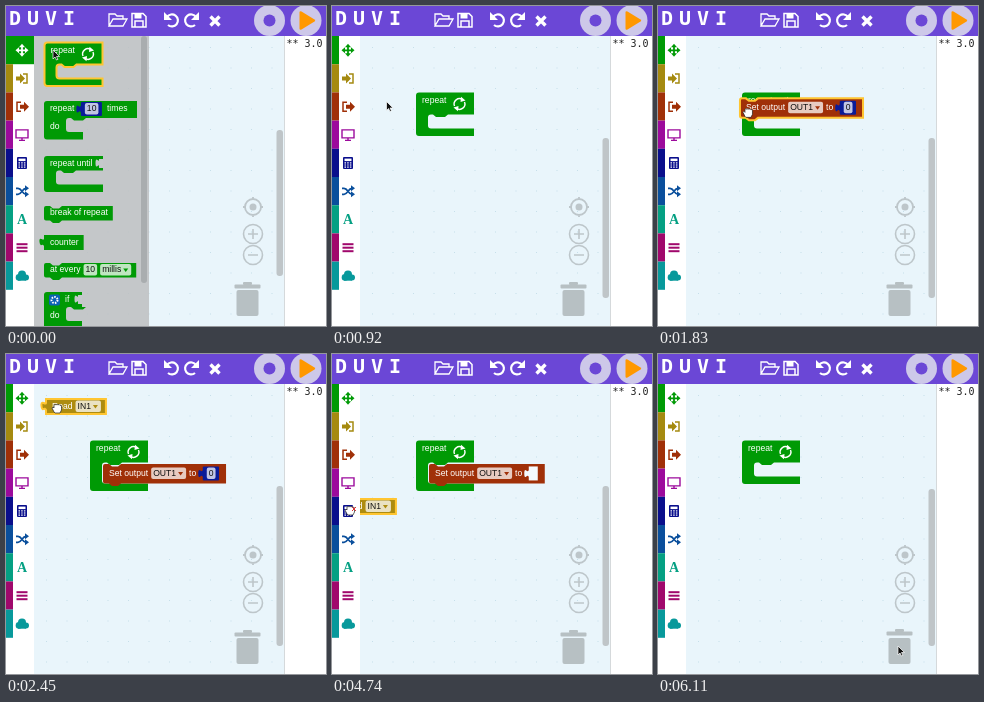
An HTML page with a canvas that plays this animation: 320 px wide and 320 px high, repeating every 6.26 s.

```html
<!DOCTYPE html>
<html lang="en">
<head>
<meta charset="utf-8">
<title>Block editor demo</title>
<style>
html, body { margin: 0; width: 100%; height: 100%; overflow: hidden; }
canvas { display: block; width: 100vw; height: 100vh; }
</style>
</head>
<body>
<canvas id="stage" width="320" height="320"></canvas>
<script>
const ctx = document.getElementById('stage').getContext('2d');
const LOOP = 6260, STEPS = 41;
const GREEN = '#009a05', BROWN = '#a03008', OLIVE = '#ad8c10', NAVY = '#0a1b98', PURPLE = '#6b47d6';
const CATEGORIES = [GREEN, '#a58a10', BROWN, '#9c0a9c', '#0a0f8c', '#0a4f9c', '#05a083', '#a0086c', '#08999b'];
const BLOCK_FONT = "8.6px 'Liberation Sans', Arial, sans-serif";

// Basic drawing helpers
function rect(x, y, w, h, color, r = 0) {
  ctx.fillStyle = color;
  ctx.beginPath();
  ctx.roundRect(x, y, w, h, r);
  ctx.fill();
}
function disc(x, y, r, color) {
  ctx.fillStyle = color;
  ctx.beginPath();
  ctx.arc(x, y, r, 0, 7);
  ctx.fill();
}
function text(str, x, y, color, font = BLOCK_FONT) {
  ctx.font = font;
  ctx.fillStyle = color;
  ctx.textBaseline = 'middle';
  ctx.fillText(str, x, y);
}
function stroke(d, color, width) {
  ctx.strokeStyle = color;
  ctx.lineWidth = width;
  ctx.stroke(new Path2D(d));
}
function fill(d, color) {
  ctx.fillStyle = color;
  ctx.fill(new Path2D(d));
}
function at(x, y, draw) {
  ctx.save();
  ctx.translate(x, y);
  draw();
  ctx.restore();
}
function textWidth(str) {
  ctx.font = BLOCK_FONT;
  return ctx.measureText(str).width;
}

// Block contents: plain strings, {d} dropdown, {f} field, {n} number block, {read}, {empty}, {gear}
const READ = ['Read', { d: 'IN1' }];
const isPlug = t => Boolean(t.n || t.read || t.empty);
function tokenWidth(t) {
  if (typeof t === 'string') return textWidth(t);
  if (t.d) return textWidth(t.d) + 12;
  if (t.f) return textWidth(t.f) + 4;
  if (t.n) return textWidth(t.n) + 11.5;
  if (t.read) return flow(READ).width;
  return t.gear ? 12 : 9;
}
function flow(tokens) {
  let x = 6;
  const items = tokens.map(token => {
    if (isPlug(token)) x += 3.5;
    const item = { token, x };
    x += tokenWidth(token) + (isPlug(token) ? 5 : 3);
    return item;
  });
  return { items, width: x + 2 };
}
function field(str, x, y, color, arrow) {
  const w = textWidth(str) + (arrow ? 12 : 4);
  rect(x, y - 6, w, 11.5, 'rgba(255,255,255,.75)', 2);
  text(str, x + 2, y, '#111');
  if (arrow) fill(`M${x + w - 8} ${y - 1.5}h5l-2.5 3.5z`, color);
}
function tab(x, y, color) {
  fill(`M${x + .5} ${y - 4}v8q-1-3-3-1t-2-3t2-3t3-1z`, color);
}
function drawTokens(tokens, x, y, color) {
  for (const item of flow(tokens).items) {
    const t = item.token, tx = x + item.x;
    if (typeof t === 'string') text(t, tx, y, '#fff');
    else if (t.d || t.f) field(t.d || t.f, tx, y, color, t.d);
    else if (t.n) {
      rect(tx, y - 7, tokenWidth(t), 14, NAVY, 1);
      tab(tx, y, NAVY);
      field(t.n, tx + 4, y, NAVY);
    } else if (t.read) readBlock(tx, y - 7, true);
    else if (t.empty) {
      rect(tx, y - 7, 9, 14, '#f4fafd');
      tab(tx, y, '#f4fafd');
    } else {
      rect(tx - 1, y - 5.5, 11, 11, '#0b62b4', 2);
      ctx.setLineDash([1.5, 1.2]);
      ctx.strokeStyle = '#fff';
      ctx.lineWidth = 2;
      ctx.beginPath();
      ctx.arc(tx + 4.5, y, 3, 0, 7);
      ctx.stroke();
      ctx.setLineDash([]);
    }
  }
}
function outline(d, selected) {
  if (selected) stroke(d, '#ffc531', 2);
}
function statement(x, y, tokens, selected, color = BROWN) {
  const h = tokens.some(isPlug) ? 19.5 : 14.5, w = flow(tokens).width;
  const d = `M${x + 2} ${y}h4l3 2.5h6l3-2.5H${x + w}v${h}H${x + 18}l-3 2.5h-6l-3-2.5H${x + 2}q-2 0-2-2V${y + 2}q0-2 2-2z`;
  fill(d, color);
  drawTokens(tokens, x, y + h / 2 - .3, color);
  outline(d, selected);
}
function valueBlock(x, y, tokens, color, selected) {
  const w = flow(tokens).width;
  const d = `M${x} ${y}h${w}v15h${-w}v-4q-1-2-2.5-1t-2-3t2-3t2.5 0z`;
  fill(d, color);
  drawTokens(tokens, x, y + 7.5, color);
  outline(d, selected);
}
function readBlock(x, y, selected) {
  valueBlock(x, y, READ, OLIVE, selected);
}
// C-shaped block with a statement opening
function loopBlock(x, y, o) {
  const { w, top, inner = 14, arm = 12, foot = w, selected } = o;
  const a = x + arm, t = y + top, b = t + inner;
  const d = `M${x + 3} ${y}H${x + w}V${t}H${a + 20}l-3 2.5h-9l-3-2.5h-2q-3 0-3 3V${b - 3}q0 3 3 3H${x + foot}v7.5` +
    `H${x + 3}q-3 0-3-3V${y + 3}q0-3 3-3z`;
  fill(d, GREEN);
  drawTokens(o.tokens, x, y + (o.textY || 8), GREEN);
  if (o.label) text(o.label, x + 6, t + 9, '#fff');
  if (o.socket) {
    rect(x + w - 4, y + 3, 4, 9, '#c5c9cb');
    tab(x + w - 3, y + 7, '#c5c9cb');
  }
  outline(d, selected);
}
function repeatBlock(x, y, inner = 14, selected) {
  loopBlock(x, y, { w: 58, top: 22, inner, tokens: ['repeat'], selected });
  at(x + 43.5, y + 11.5, () => {
    for (let i = 0; i < 2; i++) {
      stroke('M-5 2A5.3 5.3 0 0 1 3-4.3', '#fff', 1.4);
      fill('M1.5-7.2L6-3.6L1-2z', '#fff');
      ctx.rotate(Math.PI);
    }
  });
}
const setOutput = plug => ['Set output', { d: 'OUT1' }, 'to', plug];
const ZERO = { n: '0' };

// Flyouts
function flyout(width) {
  rect(28, 30, width, 290, 'rgba(190,192,193,.85)');
}
function loopFlyout() {
  flyout(115);
  rect(135, 30, 6, 247, '#a9adaf', 3);
  repeatBlock(38.5, 36.5, 14, true);
  loopBlock(38, 95, { w: 93, top: 17, arm: 22, foot: 39, tokens: ['repeat', { n: '10' }, 'times'], label: 'do' });
  loopBlock(38, 150, { w: 59, top: 14.5, tokens: ['repeat until'], socket: true });
  statement(38, 200, ['break of repeat'], false, GREEN);
  valueBlock(38, 229, ['counter'], GREEN);
  statement(38, 257, ['at every', { f: '10' }, { d: 'millis' }], false, GREEN);
  loopBlock(38, 286, { w: 38, top: 15, arm: 22, tokens: [{ gear: 1 }, 'if'], label: 'do', socket: true });
}
function outputFlyout() {
  flyout(250);
  const play = ['Play', { d: 'OUT1' }], led = { d: 'onHead' };
  statement(38.5, 37, setOutput(ZERO), true);
  statement(38, 73, ['Set servo', { d: 'OUT1' }, 'to', ZERO]);
  statement(38, 110, [...play, 'octave', { d: '1' }, 'note', { d: 'C' }]);
  statement(38, 141, [...play, 'frequency', { n: '260' }, 'Hz']);
  statement(38, 177.5, ['Mute', { d: 'OUT1' }]);
  statement(38, 209, ['Set LED', led, 'red', ZERO, 'green', ZERO, 'blue', ZERO, 'at', ZERO]);
  statement(38, 245.5, ['Clear LED', led]);
}
function inputFlyout() {
  flyout(82);
  readBlock(40, 45, true);
}

// Interface
function header() {
  rect(0, 0, 320, 30, PURPLE);
  ctx.letterSpacing = '6px';
  text('DUVI', 3, 14, '#fff', "bold 20px 'DejaVu Sans Mono', monospace");
  ctx.letterSpacing = '0px';
  stroke('M103 20V8h6l2 2h6v3M103 20l4-7h14l-4 7z', '#fff', 1.3);
  stroke('M126 7.5h11l3 3v10.5h-14zM129 21v-6h8v6', '#fff', 1.5);
  rect(128.5, 7.5, 7, 5, '#fff');
  stroke('M161 11A6 6 0 1 1 162 19', '#fff', 2.2);
  fill('M158 6v8h8z', '#fff');
  stroke('M190 11A6 6 0 1 0 189 19', '#fff', 2.2);
  fill('M193 6v8h-8z', '#fff');
  stroke('M204.500 10.500l9 9M213.500 10.500l-9 9', '#fff', 3.4);
  disc(263.5, 14.5, 15.5, '#cdc8e9');
  disc(263.5, 14.5, 6, PURPLE);
  disc(300, 14.5, 15.5, '#cdc8e9');
  fill('M293.500 6.500q0-2 2-1l13 8q1.500 1 0 2l-13 8q-2 1-2-1z', '#ff9800');
}
const ICONS = [
  c => {
    stroke('M-4 0H4M0-4V4', c, 1.8);
    for (let i = 0; i < 4; i++) { fill('M3-3L6.500 0L3 3z', c); ctx.rotate(Math.PI / 2); }
  },
  c => { fill('M-6-2h4v-3l5 5l-5 5v-3h-4z', c); stroke('M1-4.500h4v9h-4', c, 1.5); },
  c => { fill('M-2-2h4v-3l5 5l-5 5v-3h-4z', c); stroke('M-1-4.500h-4v9h4', c, 1.5); },
  c => { stroke('M-6-5h12v8h-12zM-3 5.500h6M0 3v2', c, 1.4); },
  c => {
    rect(-5, -6, 10, 12, c, 1);
    rect(-3.5, -4.5, 7, 2.5, '#fff');
    for (let i = 0; i < 9; i++) rect(-3.5 + i % 3 * 2.7, -.8 + Math.floor(i / 3) * 2.1, 1.5, 1.2, '#fff');
  },
  c => {
    stroke('M-6-3h2C0-3 0 3 4 3M-6 3h2C0 3 0-3 4-3', c, 1.7);
    fill('M3-6l4 3l-4 3zM3 0l4 3l-4 3z', c);
  },
  c => text('A', -5, .5, c, "bold 14px 'Liberation Serif', serif"),
  c => [-4.5, -1, 2.5].forEach(y => rect(-5.5, y, 11, 2, c)),
  c => { disc(-3, 1.5, 3.3, c); disc(0, -1.5, 4, c); disc(4, 1.5, 3, c); rect(-4, 1, 8, 3.8, c); }
];
function toolbox(selected, fading) {
  rect(0, 30, 28, 290, '#fff');
  CATEGORIES.forEach((color, i) => {
    const y = 30 + 28.2 * i, on = i === selected;
    rect(0, y, on ? 28 : 7, 28.2, on && fading ? '#25a72a' : color);
    at(16, y + 14.3, () => ICONS[i](on ? (fading ? '#148419' : '#fff') : color));
  });
}
function workspace(barTop, barBottom, lidUp) {
  rect(28, 30, 250, 290, '#e9f5fb');
  for (let y = 41; y < 320; y += 20.5)
    for (let x = 40; x < 270; x += 20.5) rect(x, y, 1, 1, '#c6dfea');
  rect(270.5, barTop, 6.5, barBottom - barTop, '#bfc5c8', 3);
  const gray = '#bdc6ca';
  stroke('M239 201a8 8 0 1 0 16 0a8 8 0 1 0-16 0M237 201h3M254 201h3M247 191v3M247 208v3', gray, 1.8);
  disc(247, 201, 3.5, gray);
  for (const y of [228, 249]) stroke(`M237.500 ${y}a9.500 9.500 0 1 0 19 0a9.500 9.500 0 1 0-19 0M242 ${y}h10`, gray, 1.6);
  stroke('M247 223v10', gray, 1.6);
  const lid = lidUp ? -1 : 0;
  rect(237, 276 + lid, 9, 3, '#b7c0c3', 1);
  rect(228.5, 278.5 + lid, 26, 4, '#b7c0c3', 1);
  rect(230.5, 284, 22, 26, '#b7c0c3', 2);
}
function consolePanel() {
  rect(278, 30, 42, 290, '#fff');
  rect(278, 30, 1, 290, '#d5d9db');
  text('** 3.0', 280.5, 38.5, '#222', "10px 'DejaVu Sans Mono', monospace");
}

// Pointer route: step, x, y
const ROUTE = [
  [0, 47, 45], [2, 48, 47], [3, 51, 51], [5, 93, 92], [7, 16, 101], [8, 44, 53], [9, 47, 56],
  [12, 105, 124], [14, 16, 73], [15, 50, 53], [16, 51, 54], [21, 207, 123], [22, 208, 130],
  [25, 208, 130], [31, 18, 156], [34, 107, 118], [35, 107, 118], [39, 240, 293], [40, 240, 293]
];
function pointerAt(step) {
  const i = Math.max(1, ROUTE.findIndex(p => p[0] >= step));
  const [s0, x0, y0] = ROUTE[i - 1], [s1, x1, y1] = ROUTE[i];
  const u = (step - s0) / (s1 - s0), e = u * u * (3 - 2 * u);
  return [x0 + (x1 - x0) * e, y0 + (y1 - y0) * e];
}
function pointer(x, y, hand) {
  at(x, y, () => {
    const d = hand
      ? 'M-3 4L-5 0q1-2 2 0V-3q1-1.500 2 0q1-1.500 2 0q1-1.500 2 .5q1-1 1.500 0.500V2L3 5H-2z'
      : 'M0-1v9l2-2l1.500 3l1.500-.7l-1.500-2.800h3z';
    fill(d, hand ? '#fff' : '#111');
    stroke(d, hand ? '#222' : '#fff', .7);
  });
}

function draw(step) {
  const during = (from, to) => step >= from && step <= to;
  const [px, py] = pointerAt(step);
  workspace(step < 5 ? 124 : 132 + (step === 40 ? 3 : 0), step < 5 ? 270 : 292, step >= 39);

  const nested = during(12, 35);
  if (during(3, 4)) repeatBlock(px - 9, py - 6);
  if (step >= 5) repeatBlock(84, 86.5, nested ? 21 : 14);
  if (nested) statement(97, 110, setOutput(step < 22 ? ZERO : step < 26 ? { read: 1 } : { empty: 1 }));
  if (during(9, 11)) statement(px - 8, py - 14, setOutput(ZERO), true);
  if (during(16, 21)) readBlock(px - 11, py - 9, true);
  if (during(26, 31)) readBlock(px - 14, py - 11, true);
  if (during(36, 39)) statement(px - 10, py - 8, setOutput({ empty: 1 }), true);

  if (step < 3) loopFlyout();
  if (during(7, 8)) outputFlyout();
  if (during(14, 15)) inputFlyout();
  const selected = step < 4 ? 0 : during(7, 8) ? 2 : during(14, 15) ? 1 : -1;
  toolbox(selected, step === 3);
  consolePanel();
  header();

  const arrow = step < 2 || during(6, 7) || during(13, 14) || during(32, 33) || step === 40;
  pointer(px, py, !arrow);
  if (during(30, 31)) stroke(`M${px + 2} ${py - 3}l4 4m0-4l-4 4`, '#d33', 1);
}

function tick() {
  const time = performance.now() % LOOP;
  draw(Math.min(STEPS - 1, Math.floor(time / LOOP * STEPS)));
  requestAnimationFrame(tick);
}
tick();
</script>
</body>
</html>
```
